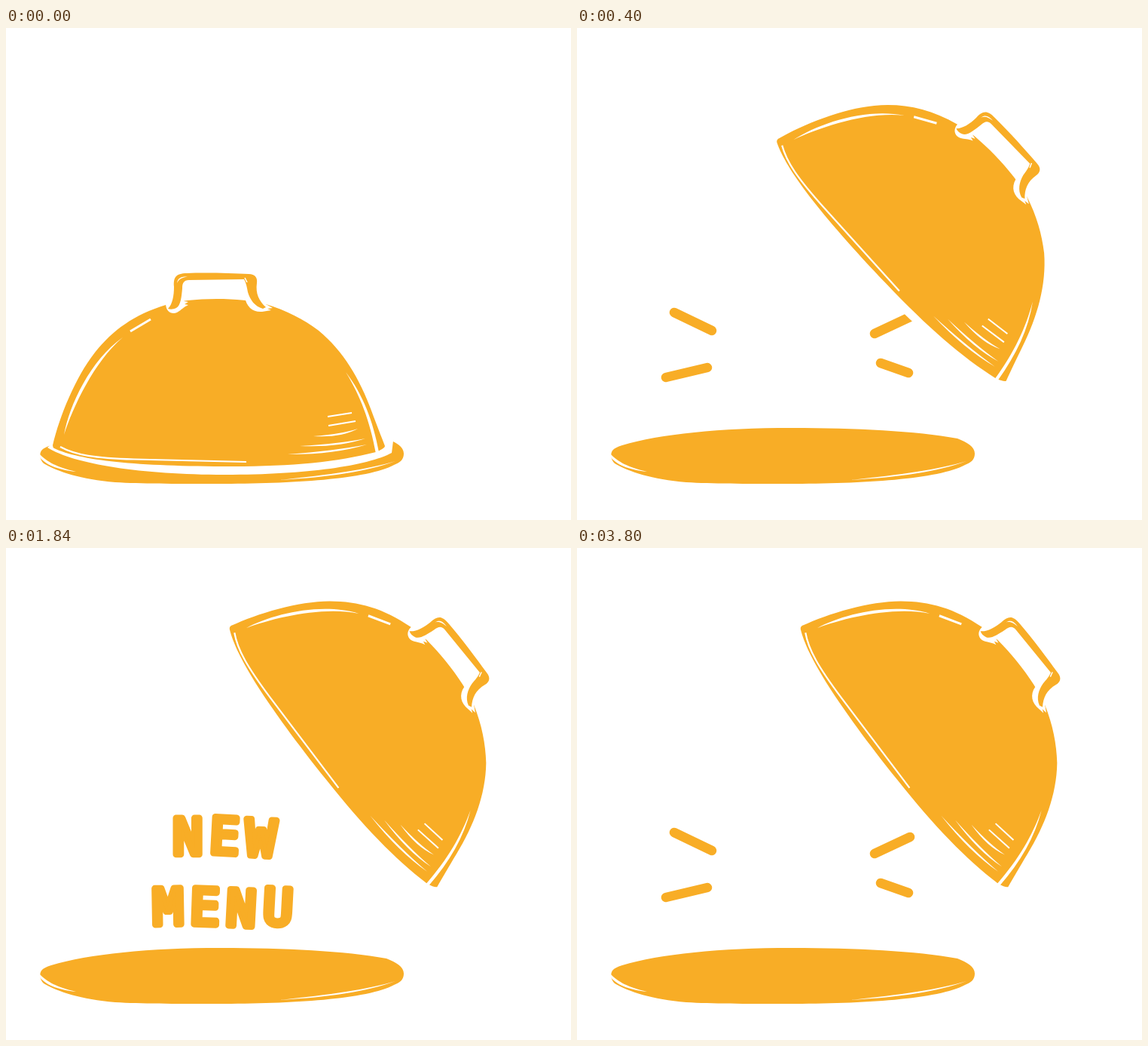
Write an HTML page with a canvas that moves like this. It is 750 by 652 pixels and loops after 4.4 s.

```html
<!DOCTYPE html>
<html lang="en">
<head>
<meta charset="utf-8">
<title>New menu</title>
<style>
html, body { margin: 0; width: 100%; height: 100%; overflow: hidden; background: #fff; }
canvas { display: block; }
</style>
</head>
<body>
<canvas id="stage" width="750" height="652"></canvas>
<script>
const ctx = document.getElementById('stage').getContext('2d');
const ORANGE = '#f8ad26', WHITE = '#fff';
const LOOP = 4400, STEP = 40, LIFT = 480;
const SWAPS = [520, 1200, 1840, 2520, 3160, 3800];

const shape = {
  plate: new Path2D('M46 562C48 557 54 555 60 553C110 538 190 530 285 530C370 530 450 534 505 544C518 549 528 555 528 564C528 572 523 576 515 579C480 598 380 604 280 604C220 604 180 604 145 602C100 598 68 588 50 577C46 573 44 567 46 562Z'),
  plateLeft: new Path2D('M44 564C54 575 68 582 93 588C66 585 52 578 45 569Z'),
  plateRight: new Path2D('M363 599C430 595 478 588 517 574C480 585 430 592 363 599Z'),
  gap: new Path2D('M55 556C90 578 180 592 290 592C400 592 480 580 512 563L514 547L499 539L300 500L63 549Z'),
  dome: new Path2D('M62 553C71 515 92 463 118 430C142 400 170 380 212 367C240 357 310 356 345 366C372 374 395 386 415 401C448 428 470 466 485 507C492 526 498 541 503 554Q503 557 491 562C440 575 380 581 300 581C172 581 98 573 64 557Q62 556 62 553Z'),
  leftFoot: new Path2D('M212 365C212 376 220 380 227 377C234 373 235 370 242 367L237 366L242 363L236 362L240 354L212 355Z'),
  rightFoot: new Path2D('M317 356C319 370 328 377 340 376L352 374L347 372L354 371L345 366L346 355Z'),
  handle: new Path2D('M215 372C221 366 223 355 223 343C222 331 225 325 240 325C265 324 300 325 322 326C331 326 334 331 333 338C331 352 336 362 345 370L341 372C330 369 324 360 321 350C320 345 319 338 316 333L243 334C236 334 234 338 234 345C233 356 232 368 226 371C222 373 218 373 215 372Z'),
  glint: new Path2D('M227 338C228 331 233 329 241 329.5C234 331 230 332 227 338Z'),
  leftShine: new Path2D('M77 539C84 500 112 440 155 410C117 442 89 502 77 539Z'),
  rightShine: new Path2D('M451 456C470 487 483 520 491 564L495 562C487 520 474 486 451 456Z'),
  rimShine: new Path2D('M72 555C92 566 118 570 170 571.5L319 575')
};

// Straight and tapered white marks on the dome
const marks = [[165, 402, 192, 386, 3], [427, 515, 459, 510, 2], [428, 527, 464, 521, 2], [317, 331, 320, 337, 1.5]];
const slivers = [[408, 541, 467, 531], [390, 554, 477, 544], [374, 565, 479, 552]];

// x1, y1, x2, y2, start time
const rays = [
  [118, 463, 173, 450, 35],
  [129, 377, 179, 401, 155],
  [395, 405, 442, 383, 235],
  [403, 444, 440, 457, 305]
];

// letter, centre x, centre y, tilt in degrees
const letters = [
  ['N', 241, 382, 0], ['E', 290, 381, 3], ['W', 338, 384, 3],
  ['M', 215, 475, -1], ['E', 264, 475, 2], ['N', 312, 477, 3], ['U', 361, 475, 3]
];

const rad = deg => deg * Math.PI / 180;
const ease = (t, a, b) => t + t * (1 - t) * (a + b * t);

function fill(path, color) {
  ctx.fillStyle = color;
  ctx.fill(path);
}

function line(x1, y1, x2, y2, width, color) {
  ctx.strokeStyle = color;
  ctx.lineWidth = width;
  ctx.beginPath();
  ctx.moveTo(x1, y1);
  ctx.lineTo(x2, y2);
  ctx.stroke();
}

function sliver(x1, y1, x2, y2) {
  const mx = (x1 + x2) / 2 + 8, my = (y1 + y2) / 2;
  ctx.fillStyle = WHITE;
  ctx.beginPath();
  ctx.moveTo(x1, y1);
  ctx.quadraticCurveTo(mx, my + 7, x2, y2);
  ctx.quadraticCurveTo(mx, my + 2, x1, y1);
  ctx.fill();
}

function drawPlate() {
  fill(shape.plate, ORANGE);
  fill(shape.plateLeft, WHITE);
  fill(shape.plateRight, WHITE);
}

function drawRay([x1, y1, x2, y2, start], time) {
  const shown = Math.min(1, (time - start) / 90);
  if (shown <= 0) return;
  ctx.save();
  ctx.beginPath();
  ctx.rect(x1 - 7, 350, (x2 - x1 + 14) * shown, 140);
  ctx.clip();
  ctx.lineCap = 'round';
  line(x1, y1, x2, y2, 12.5, ORANGE);
  ctx.restore();
}

function drawLid(t) {
  const move = ease(t, 0.015, 0.45), turn = ease(t, 0.08, 0.5);
  ctx.save();
  ctx.translate(282.5 + 153 * move, 553.5 - 277.5 * move);
  ctx.rotate(rad(51.5 * turn));
  ctx.translate(-282.5, -553.5);
  fill(shape.gap, WHITE);
  fill(shape.dome, ORANGE);
  for (const name of ['leftFoot', 'rightFoot']) fill(shape[name], WHITE);
  fill(shape.handle, ORANGE);
  for (const name of ['glint', 'leftShine', 'rightShine']) fill(shape[name], WHITE);
  ctx.strokeStyle = WHITE;
  ctx.lineWidth = 2.2;
  ctx.stroke(shape.rimShine);
  for (const m of marks) line(...m, WHITE);
  for (const s of slivers) sliver(...s);
  ctx.restore();
}

function drawText() {
  ctx.font = '66px "DejaVu Sans Mono", monospace';
  ctx.textAlign = 'center';
  ctx.lineJoin = 'round';
  ctx.lineWidth = 8.5;
  ctx.fillStyle = ctx.strokeStyle = ORANGE;
  for (const [char, x, y, tilt] of letters) {
    ctx.save();
    ctx.translate(x, y);
    ctx.rotate(rad(tilt));
    ctx.strokeText(char, 0, 24);
    ctx.fillText(char, 0, 24);
    ctx.restore();
  }
}

function draw(time) {
  ctx.fillStyle = WHITE;
  ctx.fillRect(0, 0, 750, 652);
  drawPlate();
  const showText = SWAPS.filter(s => time >= s).length % 2;
  if (showText) drawText();
  else rays.forEach(ray => drawRay(ray, time));
  drawLid(Math.min(1, time / LIFT));
}

const begin = performance.now();
function tick() {
  const time = (performance.now() - begin) % LOOP;
  draw(Math.floor(time / STEP) * STEP);
  requestAnimationFrame(tick);
}
tick();
</script>
</body>
</html>
```
